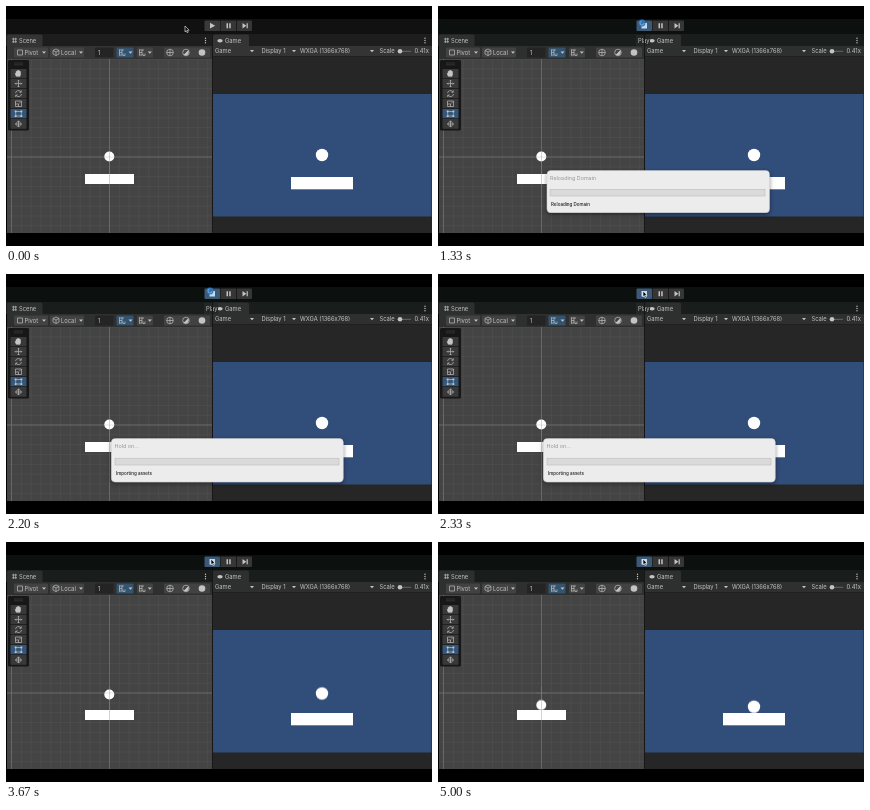
An HTML page that plays this animation: 426x240 px, repeating every 5070 ms.

```html
<!DOCTYPE html>
<html lang="en">
<head>
<meta charset="utf-8">
<title>Editor play mode</title>
<style>
html, body { margin: 0; width: 100%; height: 100%; overflow: hidden; background: #000; }
svg { display: block; width: 100vw; height: 100vh; }
text { font: 5.8px Inter, Roboto, sans-serif; fill: #c4c4c4; }
.anim { animation: 5.07s step-end infinite; }

.bar { fill: #111; animation-name: tint-bar; }
.strip { fill: #1d1d1d; animation-name: tint-strip; }
.panel { fill: #343434; animation-name: tint-panel; }
.play { fill: #3a3a3a; animation-name: press; }
.idle { animation-name: idle; }
.playing { visibility: hidden; animation-name: playing; }
.busy { visibility: hidden; animation-name: busy; }
.reload { visibility: hidden; animation-name: reload; }
.import { visibility: hidden; animation-name: import; }
.tip { visibility: hidden; animation-name: tip; }
.arrow { animation-name: arrow; }
.cursor { animation-name: travel; }
.ball { fill: #fff; animation-name: fall; }

@keyframes tint-bar { 26.2%, 100% { fill: #0c110f; } }
@keyframes tint-strip { 26.2%, 100% { fill: #191d1b; } }
@keyframes tint-panel { 26.2%, 100% { fill: #2d302f; } }
@keyframes press { 10.4% { fill: #555; } 26.2%, 100% { fill: #3c5a78; } }
@keyframes idle { 26.2%, 100% { visibility: hidden; } }
@keyframes playing { 26.2%, 100% { visibility: visible; } }
@keyframes busy { 26.2% { visibility: visible; } 44.7%, 100% { visibility: hidden; } }
@keyframes arrow { 26.2% { visibility: hidden; } 44.7%, 100% { visibility: visible; } }
@keyframes tip { 26.2% { visibility: visible; } 47.3%, 100% { visibility: hidden; } }
@keyframes reload { 26.2% { visibility: visible; } 36.8%, 100% { visibility: hidden; } }
@keyframes import { 36.8% { visibility: visible; } 47.3%, 100% { visibility: hidden; } }
@keyframes travel {
  0% { transform: translate(179px, 20px); }
  1.35% { transform: translate(180px, 19.9px); }
  2.55% { transform: translate(183px, 19.6px); }
  3.9% { transform: translate(188px, 19px); }
  5.3% { transform: translate(194px, 18.3px); }
  6.5% { transform: translate(199px, 17.7px); }
  7.85% { transform: translate(202.5px, 17.3px); }
  9.25% { transform: translate(204.3px, 17.1px); }
  10.4%, 100% { transform: translate(205px, 17px); }
}
/* --u is one world unit in the view */
@keyframes fall {
  0% { transform: none; }
  72.35% { transform: translateY(calc(var(--u) * .2)); }
  73.5% { transform: translateY(calc(var(--u) * .36)); }
  74.9% { transform: translateY(calc(var(--u) * .56)); }
  76.3% { transform: translateY(calc(var(--u) * .8)); }
  77.45% { transform: translateY(calc(var(--u) * 1.08)); }
  78.85%, 100% { transform: translateY(calc(var(--u) * 1.28)); }
}

.line { fill: none; stroke: #bdbdbd; stroke-width: .7; }
.mark { fill: #c4c4c4; }
.axis { stroke: #707070; stroke-width: .8; }
.title { fill: #969696; font-size: 5.4px; }
.label { fill: #1c1c1c; font-size: 4.5px; font-weight: 500; }
.box { fill: #ececec; stroke: #c8c8c8; stroke-width: .4; }
.track { fill: #dadada; stroke: #b4b4b4; stroke-width: .5; }
</style>
</head>
<body>
<svg viewBox="0 0 426 240" preserveAspectRatio="none">
  <defs>
    <pattern id="grid" x="103.1" y="150.6" width="9.8" height="9.8" patternUnits="userSpaceOnUse">
      <path d="M.4 0V9.8M0 .4H9.8" stroke="#4f4f4f" stroke-width=".7"/>
    </pattern>
    <path id="down" class="mark" d="M-2-1H2L0 1.2Z"/>
    <g id="kebab" class="mark"><circle cy="-2.2" r=".7"/><circle r=".7"/><circle cy="2.2" r=".7"/></g>
    <g id="snap" class="line"><path d="M-3-2.5H2M-3 0H0M-3 2.5H0M-2.5-3V3M0-3V3M1 1V3H3V1"/></g>
    <filter id="shadow" x="-10%" y="-30%" width="120%" height="170%">
      <feDropShadow dx="0" dy="1.5" stdDeviation="2" flood-opacity=".45"/>
    </filter>
  </defs>

  <rect width="426" height="240"/>
  <rect class="anim bar" y="13" width="426" height="15"/>
  <rect class="anim strip" y="28" width="426" height="12"/>
  <path class="anim panel" d="M1 40V30q0-1.5 1.5-1.5H35q1.5 0 1.5 1.5V40ZM207 40V30q0-1.5 1.5-1.5H241.500q1.500 0 1.500 1.500V40Z"/>
  <path class="anim panel" d="M1 40H206V53H1ZM207 40H426V50.500H207Z"/>

  <!-- transport -->
  <rect class="anim play" x="198.500" y="14.500" width="15.500" height="10.500" rx="1"/>
  <path fill="#363636" d="M214.500 14.500H230V25H214.500ZM230.700 14.500H245a1 1 0 0 1 1 1V24a1 1 0 0 1-1 1H230.700Z"/>
  <path class="anim idle mark" d="M204 16.800L209.200 19.700L204 22.600Z"/>
  <rect class="anim playing" x="203.500" y="17" width="5.500" height="5.500" fill="#c3d9ec"/>
  <path class="mark" d="M220.500 17.200H222V22.300H220.500ZM223.200 17.200H224.700V22.300H223.200ZM236.500 17L240.300 19.700L236.500 22.400ZM240.600 17.200H241.800V22.300H240.600Z"/>

  <!-- tabs -->
  <path class="line" d="M6 33H11M6 35.800H11M7.400 31.800V37M9.700 31.800V37"/>
  <text x="13" y="36.700">Scene</text>
  <ellipse class="mark" cx="214" cy="34.700" rx="2.700" ry="1.800"/>
  <text x="219" y="36.700">Game</text>
  <use href="#kebab" x="199.500" y="34.500"/>
  <use href="#kebab" x="419" y="34.500"/>
  <g class="anim tip">
    <rect x="198" y="29" width="14" height="11" fill="#242726"/>
    <text x="200" y="36.700">Play</text>
  </g>

  <!-- scene controls -->
  <g fill="#424242">
    <rect x="8" y="41.500" width="34" height="10" rx="1"/>
    <rect x="44" y="41.500" width="34" height="10" rx="1"/>
    <rect x="131" y="41.500" width="16" height="10" rx="1"/>
    <rect x="158" y="41.500" width="46" height="10" rx="1"/>
  </g>
  <rect x="89" y="41.500" width="18.500" height="10" rx="1" fill="#242424"/>
  <rect x="110.500" y="41.500" width="17" height="10" rx="1" fill="#34536f"/>
  <path class="line" d="M11.500 44H16.500V49H11.500ZM47 44.500L50 43L53 44.500V48L50 49.500L47 48ZM47 44.500L50 46L53 44.500M50 46V49.500"/>
  <text x="18.500" y="48.600">Pivot</text>
  <text x="55" y="48.600">Local</text>
  <text x="92" y="48.600">1</text>
  <use href="#down" x="38" y="46.500"/>
  <use href="#down" x="75" y="46.500"/>
  <use href="#snap" x="116" y="46.500"/>
  <use href="#down" x="124.500" y="46.500"/>
  <g stroke="#b98a6a"><use href="#snap" x="136" y="46.500"/></g>
  <use href="#down" x="143.800" y="46.500"/>
  <circle class="line" cx="164" cy="46.500" r="3.300"/>
  <path class="line" d="M160.700 46.500H167.300M164 43.200V49.800"/>
  <circle class="line" cx="180" cy="46.500" r="3.300"/>
  <path class="mark" d="M177.700 48.800A3.300 3.300 0 0 0 182.300 44.200Z"/>
  <circle class="mark" cx="196" cy="46.500" r="3.300"/>

  <!-- game controls -->
  <text x="209" y="47.400">Game</text>
  <use href="#down" x="246" y="45"/>
  <text x="255.500" y="47.400">Display 1</text>
  <use href="#down" x="288" y="45"/>
  <text x="294" y="47.400">WXGA (1366x768)</text>
  <use href="#down" x="366" y="45"/>
  <text x="373.500" y="47.400">Scale</text>
  <path d="M394 45.300H405" stroke="#777" stroke-width=".8"/>
  <circle class="mark" cx="394" cy="45.300" r="2.300"/>
  <text x="408.500" y="47.400">0.41x</text>

  <!-- scene view -->
  <rect x="1" y="53" width="205" height="174" fill="#444"/>
  <rect x="1" y="53" width="205" height="174" fill="url(#grid)"/>
  <path class="axis" d="M5.500 53V227M1 151H206M103.500 53V227"/>
  <rect x="79" y="168" width="49" height="10" fill="#fff"/>
  <circle class="anim ball" style="--u:9.8px" cx="103.300" cy="150.500" r="5"/>
  <path d="M103.500 145V178" stroke="#888" stroke-width=".6" opacity=".6"/>
  <path d="M98 151H109" stroke="#888" stroke-width=".6" opacity=".4"/>

  <!-- tools -->
  <rect x="2" y="54" width="21" height="70.500" rx="1.500" fill="#171717"/>
  <path d="M8 57H17M8 58.800H17" stroke="#444" stroke-width=".6"/>
  <g fill="#393939">
    <rect x="4.500" y="63" width="16" height="9.300"/>
    <rect x="4.500" y="73" width="16" height="9.300"/>
    <rect x="4.500" y="83" width="16" height="9.300"/>
    <rect x="4.500" y="93" width="16" height="9.300"/>
    <rect x="4.500" y="103" width="16" height="9.300" fill="#345678"/>
    <rect x="4.500" y="113" width="16" height="9.800"/>
  </g>
  <path class="mark" d="M10 70.500L8.800 67.500L9.800 67V65.300H10.700V64.500H11.800V64H12.700V64.500H13.800V65.300H14.800V69L13.800 70.700Z"/>
  <g class="line">
    <path d="M12.500 74.300V81M9.200 77.600H15.800M11.500 75.200L12.500 74.200L13.500 75.200M11.500 80L12.500 81L13.500 80M10.200 76.600L9.200 77.600L10.200 78.600M14.800 76.600L15.800 77.600L14.800 78.600"/>
    <path d="M9.500 87A3 3 0 0 1 15 86M15.500 88A3 3 0 0 1 10 89.300M15.300 84.300V86.300H13.300M9.700 91V89H11.700"/>
    <path d="M9.500 95H15.500V100.500H9.500ZM9.500 98H12.500V100.500M13 97.500L15 95.500"/>
    <path d="M9.700 105.500H15.300V110H9.700Z"/>
    <path d="M9.500 118L12.500 114.800L15.500 118L12.500 121ZM12.500 114.800V121M9.500 118H15.500"/>
  </g>
  <path class="mark" d="M8.700 104.500H10.500V106.300H8.700ZM14.500 104.500H16.300V106.300H14.500ZM8.700 109.200H10.500V111H8.700ZM14.500 109.200H16.300V111H14.500Z"/>

  <!-- game view -->
  <rect x="207" y="50.500" width="219" height="176.500" fill="#262626"/>
  <rect x="207" y="88" width="218.500" height="122.500" fill="#314d79"/>
  <rect x="285" y="171" width="62" height="12.300" fill="#fff"/>
  <circle class="anim ball" style="--u:12.3px" cx="316" cy="149" r="6.200"/>
  <path d="M206.500 28V227" stroke="#161616"/>

  <!-- dialogs -->
  <g class="anim reload">
    <rect class="box" x="109" y="164.500" width="222.500" height="42.300" rx="4" filter="url(#shadow)"/>
    <text class="title" x="112" y="173.800">Reloading Domain</text>
    <rect class="track" x="112" y="183.500" width="215" height="6.500"/>
    <text class="label" x="113" y="199.800">Reloading Domain</text>
  </g>
  <g class="anim import">
    <rect class="box" x="105.300" y="164.500" width="232" height="43.500" rx="4" filter="url(#shadow)"/>
    <text class="title" x="108.500" y="173.800">Hold on...</text>
    <rect class="track" x="109" y="184.200" width="224" height="6.800"/>
    <text class="label" x="110" y="200.800">Importing assets</text>
  </g>

  <!-- pointer -->
  <g class="anim busy">
    <circle cx="204" cy="17" r="3.400" fill="#2f74b5"/>
    <circle cx="204" cy="17" r="2" fill="none" stroke="#8fc0e6" stroke-width=".7" stroke-dasharray="8 5"/>
  </g>
  <g class="anim cursor">
    <path class="anim arrow" d="M0 0V5.800L1.300 4.600L2.200 6.700L3.200 6.200L2.300 4.200H4.100Z" fill="#000" stroke="#fff" stroke-width=".6"/>
  </g>
</svg>
</body>
</html>
```
